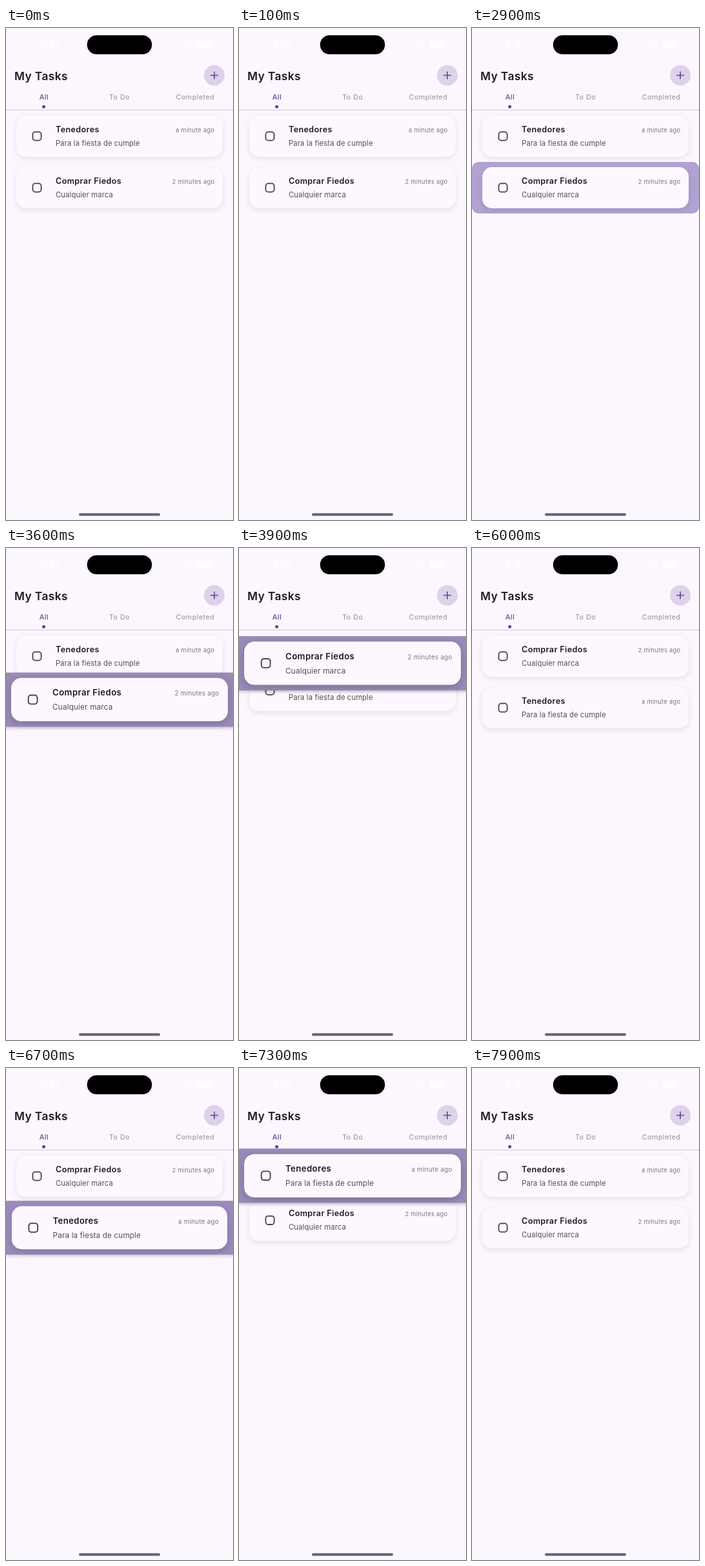
Animation of 352x764 px, one loop 8000 ms. Source, as an HTML page:

```html
<!DOCTYPE html>
<html lang="en">
<head>
<meta charset="utf-8">
<title>My Tasks</title>
<style>
  html, body { margin: 0; width: 100%; height: 100%; overflow: hidden; background: #fcf7fe; }
  body { position: relative; font-family: Inter, sans-serif; color: #1d1a21; }
  svg { position: absolute; left: 0; top: 0; }
  span { position: absolute; line-height: 20px; white-space: nowrap; }
  .clock { left: 53px; top: 16px; font-size: 14px; font-weight: 600; color: #fff; opacity: .75; }
  h1 { position: absolute; left: 13px; top: 64.5px; margin: 0; font: 600 17.3px/20px Inter, sans-serif; letter-spacing: .42px; }
  .tab { top: 98px; width: 118px; text-align: center; font-size: 10.8px; letter-spacing: .46px; color: #938f99; }
  .tab.on { font-weight: 500; color: #5d4a9b; }
  .row { position: absolute; left: 0; top: 128px; width: 352px; height: 80px; border-radius: 10px; }
  .card { position: absolute; left: 16px; top: 8px; width: 320px; height: 64px; border-radius: 15px; background: #fdf8ff; }
  .card svg { fill: none; stroke: #46424b; stroke-width: 1.8; }
  .title { left: 61px; top: 12.4px; font-size: 12.6px; font-weight: 600; letter-spacing: .36px; }
  .note { left: 61px; top: 33px; font-size: 11.2px; letter-spacing: .15px; color: #514d56; }
  .time { right: 12.6px; top: 12.6px; font-size: 9.4px; letter-spacing: .26px; color: #79757f; }
</style>
</head>
<body>
<svg width="352" height="764">
  <rect x="125.7" y="11.2" width="100.6" height="29.5" rx="14.75"/>
  <g fill="none" stroke="#fff" stroke-width="2" opacity=".8">
    <path d="M274.5 23.5Q281 17.5 287.5 23.5M277.5 26.5Q281 23.5 284.5 26.5M280 29h2"/>
    <rect x="297" y="22" width="20" height="8" rx="3" fill="#fff"/>
  </g>
  <circle cx="323" cy="73.5" r="16" fill="#ddd2ea"/>
  <path d="M317 73.5h12M323 67.5v12" stroke="#5b4795" stroke-width="1.6"/>
  <circle cx="58.5" cy="122.3" r="2.5" fill="#5d4a9b"/>
  <path d="M0 127.5h352" stroke="#cbc6d0"/>
  <rect x="113" y="753.5" width="126" height="4" rx="2" fill="#676269"/>
</svg>
<span class="clock">8:31</span>
<h1>My Tasks</h1>
<span class="tab on" style="left:0">All</span>
<span class="tab" style="left:117px">To Do</span>
<span class="tab" style="left:234.5px">Completed</span>
<script>
const LOOP = 8000, STEP = 100, ROW = 80, OVERSHOOT = 82, SETTLE = 250;
const PICKED = [177, 162, 210], LIFTED = [153, 138, 183];

const rows = [
  ['Tenedores', 'Para la fiesta de cumple', 'a minute ago'],
  ['Comprar Fiedos', 'Cualquier marca', '2 minutes ago'],
].map(([title, note, time]) => {
  const row = document.createElement('div');
  row.className = 'row';
  row.innerHTML = `<div class="card">
    <svg width="64" height="64"><rect x="25.4" y="25.4" width="13.2" height="13.2" rx="3.8"/></svg>
    <span class="title">${title}</span><span class="note">${note}</span><span class="time">${time}</span></div>`;
  document.body.append(row);
  return row;
});

// Each drag carries the lower row to the top; the other row then slides down.
const drags = [
  { row: 1, lift: 2900, move: 3560, moved: 4300, swap: 3747, drop: 4350 },
  { row: 0, lift: 6500, move: 7000, moved: 7400, swap: 7110, drop: 7650 },
];

const progress = (t, start, end) => Math.min(1, Math.max(0, (t - start) / (end - start)));
const easeInOut = p => p * p * (3 - 2 * p);
const easeOut = p => 1 - (1 - p) ** 3;
const mix = (a, b, p) => a + (b - a) * p;
const settle = (t, start) => easeInOut(progress(t, start, start + SETTLE));

function place(row, y, held, lift) {
  const color = PICKED.map((c, i) => mix(c, LIFTED[i], lift));
  row.style.transform = `translateY(${y}px) scale(${1 + .05 * lift})`;
  row.style.zIndex = held ? 1 : 0;
  row.style.background = held ? `rgb(${color})` : 'none';
  row.style.boxShadow = `0 2px 5px rgba(0,0,0,${.25 * lift ** 3})`;
  row.firstChild.style.boxShadow = `0 3px 10px rgba(30,20,50,${mix(.1, .22, lift)})`;
}

function draw(t) {
  const d = drags[t < drags[1].lift ? 0 : 1];
  const held = t >= d.lift && t < d.drop + SETTLE;
  const dropped = settle(t, d.drop);
  const lift = settle(t, d.lift) * (1 - dropped);
  const carried = ROW - OVERSHOOT * easeOut(progress(t, d.move, d.moved));
  place(rows[d.row], mix(carried, 0, dropped), held, lift);
  place(rows[1 - d.row], ROW * settle(t, d.swap), false, 0);
}

function tick() {
  const t = performance.now() % LOOP;
  draw(Math.floor(t / STEP) * STEP);
  requestAnimationFrame(tick);
}
tick();
</script>
</body>
</html>
```
